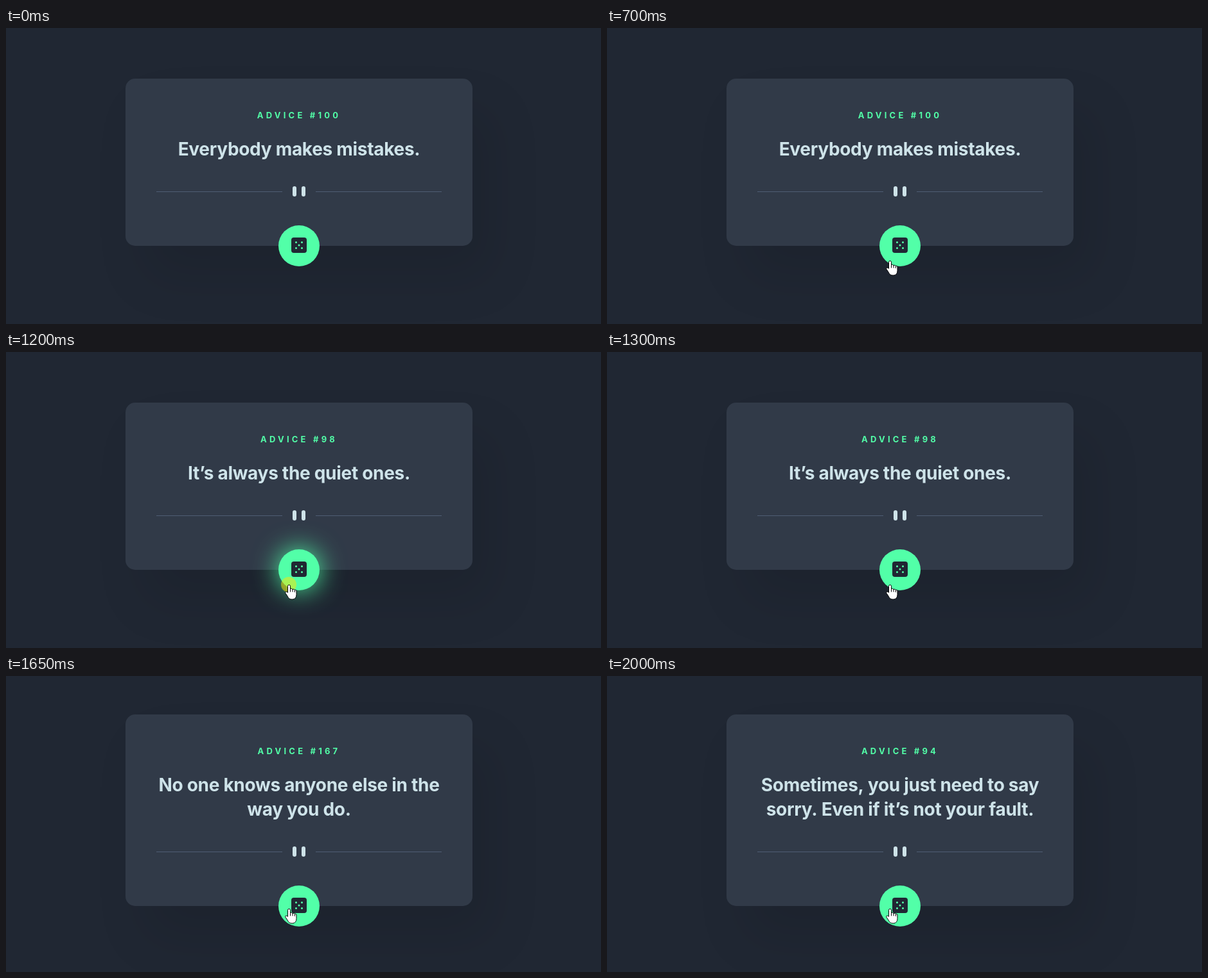
These frames come from a looping animation (926 by 462 pixels, 2100 ms). An HTML page with a canvas:

```html
<!DOCTYPE html>
<html lang="en">
<head>
<meta charset="utf-8">
<title>Advice card</title>
<style>
  html, body { margin: 0; width: 100%; height: 100%; overflow: hidden; background: #202733; }
  canvas { display: block; width: 100vw; height: 100vh; }
</style>
</head>
<body>
<canvas id="stage" width="926" height="462"></canvas>
<script>
const ctx = document.getElementById('stage').getContext('2d');
const W = 926, H = 462, CX = 456, MID = 209.5;
const LOOP = 2100, STEP = 50, FADE = 100;
const DARK = '#202733', CARD = '#313a48', PALE = '#cee3e9', GREEN = '#52ffa8';
const TIP = { x: 440, y: 363 };

const quotes = {
  100: ['Everybody makes mistakes.'],
  97: ['If you are ever in doubt about', 'whether or not to wash your hair:', 'Wash it.'],
  98: ['It’s always the quiet ones.'],
  167: ['No one knows anyone else in the', 'way you do.'],
  114: ['Step 1. Give a shit. Step 2. Don’t', 'be a dick. Step 3. Know when to', 'let go.'],
  94: ['Sometimes, you just need to say', 'sorry. Even if it’s not your fault.']
};

// Each piece of advice stays until the next one starts.
const shows = [
  { at: 0, number: 100 }, { at: 850, number: 167 }, { at: 1000, number: 97 },
  { at: 1050, number: 98 }, { at: 1500, number: 167 }, { at: 1750, number: 114 },
  { at: 1900, number: 94 }
];
const clicks = [600, 800, 900, 1200, 1400, 1900];

const hand = new Path2D('M-2 12V2a2 2 0 0 1 4 0V7a1.8 1.8 0 0 1 3.5 .5a1.8 1.8 0 0 1 3.3 .7' +
  'a1.6 1.6 0 0 1 2.7 1.3V15C11.5 19 9.5 22.5 5 22.5C0 22.5-1 20-2.5 17.5L-5.5 13' +
  'C-6.5 10.5-4 9.8-2 12Z');
const knuckles = new Path2D('M2 7v4M5.5 7.5v3.5M8.8 8.5v3');
const arrow = new Path2D('M.5 .5V16.5L4.2 13L6.8 18.8L9.3 17.7L6.8 12H11.8Z');

function box(x, y, w, h, r, color) {
  ctx.fillStyle = color;
  ctx.beginPath();
  ctx.roundRect(x, y, w, h, r);
  ctx.fill();
}

function disc(x, y, r, color) {
  ctx.fillStyle = color;
  ctx.beginPath();
  ctx.arc(x, y, r, 0, Math.PI * 2);
  ctx.fill();
}

function label(text, y, size, spacing, color) {
  ctx.font = `700 ${size}px Inter, sans-serif`;
  ctx.letterSpacing = spacing + 'px';
  ctx.fillStyle = color;
  ctx.fillText(text, CX, y);
}

function withShadow(x, y, blur, color, paint) {
  ctx.save();
  ctx.shadowOffsetX = x;
  ctx.shadowOffsetY = y;
  ctx.shadowBlur = blur;
  ctx.shadowColor = color;
  paint();
  ctx.restore();
}

function drawButton(y, glow) {
  withShadow(0, 0, 40, `rgba(82,255,168,${glow})`, () => disc(CX, y, 32, GREEN));
  box(CX - 12, y - 13, 24, 24, 4, DARK);
  disc(CX, y - 1, 1.5, GREEN);
  for (const dx of [-4.5, 4.5])
    for (const dy of [-4.5, 4.5]) disc(CX + dx, y - 1 + dy, 1.5, GREEN);
}

function drawCard(number, glow) {
  const lines = quotes[number];
  const h = 223 + 38 * lines.length;
  const top = Math.round(MID - h / 2), bottom = top + h;

  withShadow(30, 50, 80, 'rgba(0,0,0,.1)', () => box(186, top, 540, h, 15, CARD));
  label('ADVICE #' + number, top + 62, 13, 4.2, GREEN);
  lines.forEach((line, i) => label(line, top + 120 + 38 * i, 28, -0.3, PALE));

  const y = bottom - 85;
  for (const side of [-1, 1]) {
    box(CX + side * 124 - 98, y, 196, 1, 0, '#4f5d74');
    box(CX + side * 7 - 3, y - 8, 6, 16, 3, PALE);
  }
  drawButton(bottom, glow);
}

// The pointer eases in from the bottom edge and turns into a hand on arrival.
function drawCursor(t) {
  if (t < STEP) return;
  const p = Math.min(1, (t - STEP) / 500);
  const left = (1 - p) ** 2;
  const shape = p === 1 ? hand : arrow;
  ctx.save();
  ctx.translate(TIP.x + 0.5 - 67 * left, TIP.y + 0.5 + 92 * left);
  ctx.fillStyle = '#fff';
  ctx.strokeStyle = '#000';
  ctx.lineJoin = 'round';
  ctx.fill(shape);
  ctx.stroke(shape);
  if (shape === hand) ctx.stroke(knuckles);
  ctx.restore();
}

function draw(t) {
  const { number } = shows.findLast(s => s.at <= t);
  const age = t - (clicks.findLast(c => c <= t) ?? -FADE);
  ctx.fillStyle = DARK;
  ctx.fillRect(0, 0, W, H);
  ctx.textAlign = 'center';
  drawCard(number, Math.max(0, 1 - age / FADE));
  if (age < STEP) disc(TIP.x, TIP.y, 12, 'rgba(255,230,0,.5)');
  drawCursor(t);
}

const start = performance.now();
function tick() {
  const t = (performance.now() - start) % LOOP;
  draw(Math.floor(t / STEP) * STEP);
  requestAnimationFrame(tick);
}
tick();
</script>
</body>
</html>
```
